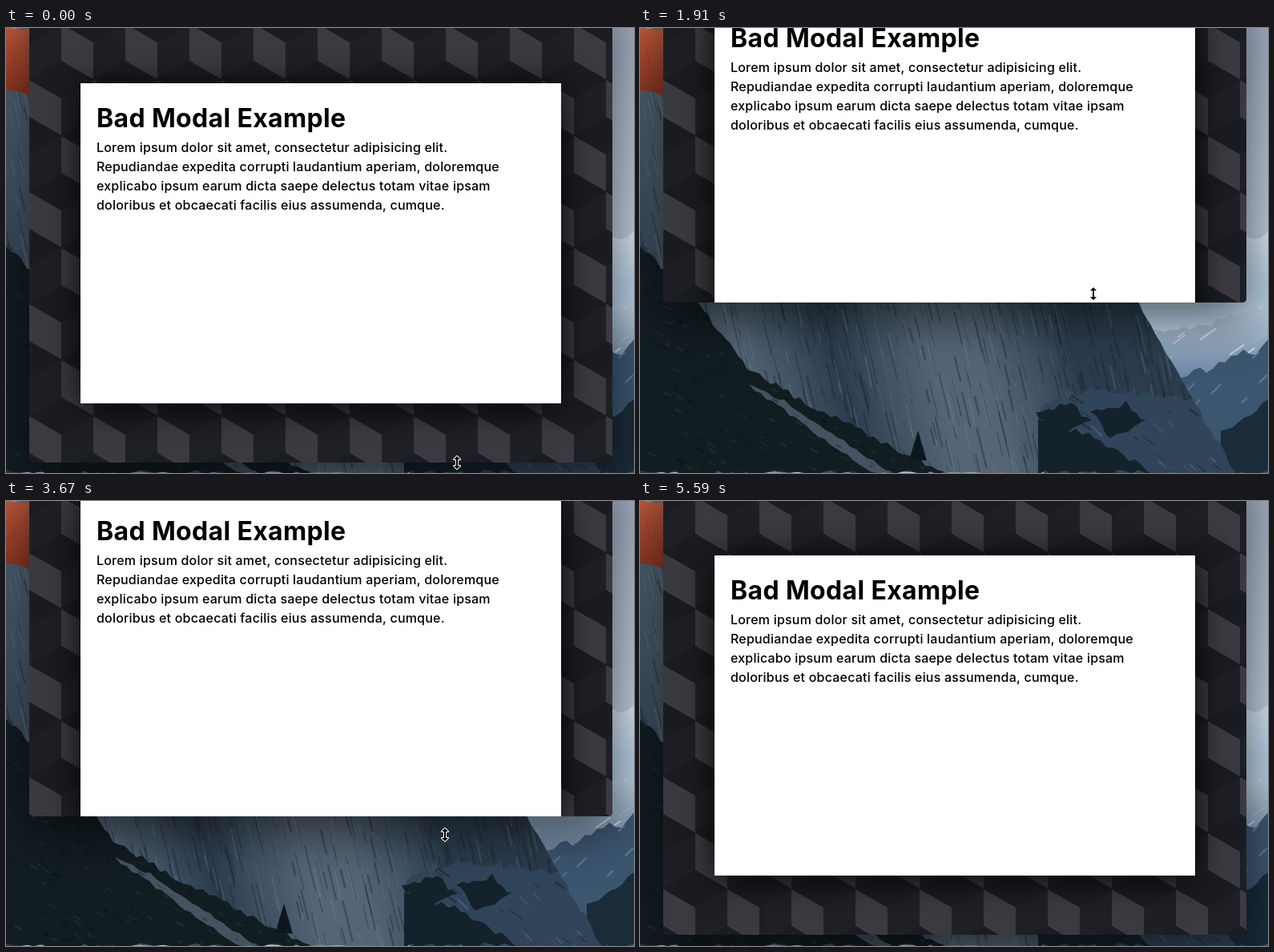
These frames come from a looping animation (784x556 px, 5.69 s). An HTML page with a canvas:

```html
<!DOCTYPE html>
<html lang="en">
<head>
<meta charset="utf-8">
<title>Bad Modal Example</title>
<style>
  html, body { margin: 0; width: 100%; height: 100%; overflow: hidden; background: #111; }
  canvas { display: block; }
</style>
</head>
<body>
<canvas id="stage" width="784" height="556"></canvas>
<script>
const W = 784, H = 556, LOOP = 5690;
const PAGE_LEFT = 29, PAGE_WIDTH = 728;
const DOWN_START = 590, DOWN_END = 2790, UP_START = 3080, UP_TIME = 1406;
const SMALLEST = 208, LARGEST = 542;
const ctx = document.getElementById('stage').getContext('2d');

const LINES = [
  'Lorem ipsum dolor sit amet, consectetur adipisicing elit.',
  'Repudiandae expedita corrupti laudantium aperiam, doloremque',
  'explicabo ipsum earum dicta saepe delectus totam vitae ipsam',
  'doloribus et obcaecati facilis eius assumenda, cumque.'
];

const clamp = v => Math.min(1, Math.max(0, v));

// The picture holds between these moments.
const series = (start, step, count) =>
  Array.from({ length: count }, (_, k) => start + Math.round(k * step / 10) * 10);
const STEPS = [0, ...series(DOWN_START, 146.9, 16), ...series(3090, 146, 14), 5590];

// The window's bottom edge is dragged up at a steady speed, then back down
// with an ease-out; the pointer runs a little ahead of it.
function poseAt(time) {
  const t = STEPS.findLast(step => step <= time);
  if (t < UP_START) {
    const lead = Math.sin(Math.PI * clamp((t - DOWN_START) / (DOWN_END - DOWN_START)));
    const bottom = Math.min(LARGEST + 1, SMALLEST + 0.1538 * (DOWN_END - t));
    return { bottom: Math.round(bottom), x: 563 + 3 * clamp(t / 1320), y: bottom - 12 * lead };
  }
  const p = clamp((t - UP_START) / UP_TIME);
  const bottom = LARGEST - (LARGEST - SMALLEST) * (1 - p) ** 1.5;
  const overshoot = 0.15 * Math.max(0, t - UP_START - UP_TIME);
  return {
    bottom: Math.round(bottom),
    x: 566 - 0.03 * (t - UP_START),
    y: bottom + 23 * Math.sin(Math.PI * p) + overshoot
  };
}

function layer(width, height, draw) {
  const canvas = document.createElement('canvas');
  canvas.width = width;
  canvas.height = height;
  draw(canvas.getContext('2d'));
  return canvas;
}

function gradient(c, x0, y0, x1, y1, ...colors) {
  const g = c.createLinearGradient(x0, y0, x1, y1);
  colors.forEach((color, i) => g.addColorStop(i / (colors.length - 1), color));
  return g;
}

let seed = 7;
const random = () => (seed = seed * 16807 % 2147483647) / 2147483647;

// Fills a polygon whose sides are broken up by random jitter.
function shape(c, fill, points, jitter = 0) {
  const path = new Path2D();
  points.forEach(([x, y], i) => {
    const [nextX, nextY] = points[(i + 1) % points.length];
    const parts = jitter ? Math.ceil(Math.hypot(nextX - x, nextY - y) / 9) : 1;
    for (let k = 0; k < parts; k++) {
      const f = k / parts;
      path.lineTo(x + (nextX - x) * f, y + (nextY - y) * f + (random() - 0.5) * jitter);
    }
  });
  path.closePath();
  c.fillStyle = fill;
  c.fill(path);
  return path;
}

// Ground below a skyline.
const ridge = (c, fill, skyline, jitter) =>
  shape(c, fill, [...skyline, [skyline.at(-1)[0], H], [skyline[0][0], H]], jitter);

// Random strokes inside a path.
function texture(c, path, color, count, dx, dy) {
  c.save();
  c.clip(path);
  c.strokeStyle = color;
  for (let i = 0; i < count; i++) {
    const x = random() * W, y = random() * H, length = 0.3 + random();
    c.lineWidth = 0.5 + random() * 2;
    c.beginPath();
    c.moveTo(x, y);
    c.lineTo(x + dx * length, y + dy * length);
    c.stroke();
  }
  c.restore();
}

const wallpaper = layer(W, H, c => {
  c.fillStyle = gradient(c, 0, 0, 0, 420, '#a0abbf', '#b0bccc', '#bccbdb', '#b5cde3');
  c.fillRect(0, 0, W, H);
  ridge(c, gradient(c, 0, 260, 0, 380, '#d3e1ee', '#b4cbe0', '#b8cfe4'), [[600, 298], [680, 270], [W, 258]], 10);

  const peaks = ridge(c, gradient(c, 0, 350, 0, 500, '#b9cadb', '#7690ab', '#304a63'), [[636, 380], [705, 372], [W, 342]], 8);
  texture(c, peaks, '#e9f1f899', 700, -20, 14);
  const lowSlopes = ridge(c, '#3c5670', [[660, 432], [715, 426], [W, 396]], 16);
  texture(c, lowSlopes, '#7d98b488', 400, -14, 14);
  ridge(c, '#1a2b3a', [[725, 506], [W, 468]], 8);

  const [lit, mid, dark] = ['#556575', '#425364', '#2c3c4c'];
  const wall = ridge(c,
    gradient(c, 0, 400, 680, 230, dark, mid, lit, mid, dark, mid, lit, lit, mid, dark, dark, dark, dark),
    [[0, 0], [566, 0], [570, 208], [602, 300], [628, 355], [690, 464]], 3);
  texture(c, wall, '#14212e60', 800, 11, 46);
  texture(c, wall, '#8596a738', 500, 9, 40);

  const sunset = gradient(c, 0, 0, 0, 320, '#c25a3b', '#8c3521', '#a34527', '#b94f2c', '#713a30');
  const sunlit = [
    [[0, 0], [48, 0], [48, 88], [0, 78]],
    [[272, 200], [446, 200], [465, 322], [400, 290], [340, 256]]
  ];
  for (const face of sunlit) texture(c, shape(c, sunset, face, 5), '#5f261950', 500, 4, 26);

  const slope = ridge(c, '#31455a', [[500, 474], [570, 450], [690, 464], [744, 556]], 8);
  texture(c, slope, '#14232f90', 500, 14, 10);
  texture(c, slope, '#7189a050', 300, 10, 10);
  for (const x of [494, 562]) {
    shape(c, '#13222b', [[x, 478], [x + 45, 470], [x + 70, 492], [x + 25, 512]], 10);
  }
  ridge(c, '#13222b', [[497, 490], [560, 508], [640, 556]], 8);

  const woods = ridge(c, '#121d22', [[0, 272], [64, 334], [134, 425], [214, 472], [380, 556]], 8);
  texture(c, woods, '#2b3c3a80', 700, 8, 4);
  texture(c, woods, '#070d1190', 700, 8, 4);
  const scree = shape(c, '#455361', [[136, 446], [180, 466], [314, 556], [288, 556]], 5);
  texture(c, scree, '#1a262f90', 500, 10, 6);
  shape(c, '#0c171d', [[347, 504], [358, 540], [336, 540]], 2);
});

const cubes = layer(80, 140, c => {
  c.fillStyle = '#1b1c21';
  c.fillRect(0, 0, 80, 140);
  // Two staggered rows, repeated so that they wrap around the tile.
  for (let row = -2; row < 2; row++) {
    for (const x of row % 2 ? [-40, 40] : [0]) {
      const y = row * 70;
      shape(c, '#1f2026', [[x + 40, y + 23], [x + 80, y], [x + 80, y + 46], [x + 40, y + 69]]);
      shape(c, '#3a3a40', [[x, y], [x + 40, y + 23], [x + 40, y + 69], [x, y + 46]]);
    }
  }
});
const cubePattern = ctx.createPattern(cubes, 'repeat');
cubePattern.setTransform(new DOMMatrix([1, 0, 0, 1, PAGE_LEFT, 65]));

function shadow(color, blur, offsetY) {
  ctx.shadowColor = color;
  ctx.shadowBlur = blur;
  ctx.shadowOffsetY = offsetY;
}

function write(text, y, font, spacing) {
  ctx.font = font;
  ctx.letterSpacing = spacing;
  ctx.fillText(text, 113, y);
}

function drawModal(top) {
  ctx.save();
  shadow('rgba(0,0,0,.9)', 40, 4);
  ctx.fillStyle = '#fff';
  ctx.fillRect(93, top, 600, 400);
  ctx.restore();
  ctx.fillStyle = '#000';
  write('Bad Modal Example', top + 55, '700 32px Inter, sans-serif', '0.35px');
  LINES.forEach((line, i) => write(line, top + 86 + 24 * i, '500 16px Inter, sans-serif', '0.2px'));
}

function drawPage(bottom) {
  ctx.save();
  ctx.beginPath();
  ctx.roundRect(PAGE_LEFT, -40, PAGE_WIDTH, bottom + 40, 5);
  ctx.save();
  shadow('rgba(0,0,0,.55)', 60, 20);
  ctx.fillStyle = '#1b1c21';
  ctx.fill();
  ctx.restore();
  ctx.clip();
  ctx.fillStyle = cubePattern;
  ctx.fillRect(PAGE_LEFT, 0, PAGE_WIDTH, bottom);
  drawModal(Math.round(bottom / 2 - 202.6));
  ctx.restore();
}

function drawPointer(x, y) {
  ctx.save();
  ctx.translate(Math.round(x), Math.round(y));
  ctx.beginPath();
  for (const s of [1, -1]) {
    for (const [px, py] of [[-1, -4], [-4, -4], [0, -8], [4, -4], [1, -4]]) ctx.lineTo(px * s, py * s);
  }
  ctx.closePath();
  ctx.lineJoin = 'round';
  ctx.lineWidth = 2;
  ctx.strokeStyle = '#fff';
  ctx.stroke();
  ctx.fillStyle = '#000';
  ctx.fill();
  ctx.restore();
}

function render(now) {
  const { bottom, x, y } = poseAt(now % LOOP);
  ctx.drawImage(wallpaper, 0, 0);
  drawPage(bottom);
  drawPointer(x, y);
}

const start = performance.now();
function tick() {
  render(performance.now() - start);
  requestAnimationFrame(tick);
}
tick();
</script>
</body>
</html>
```
